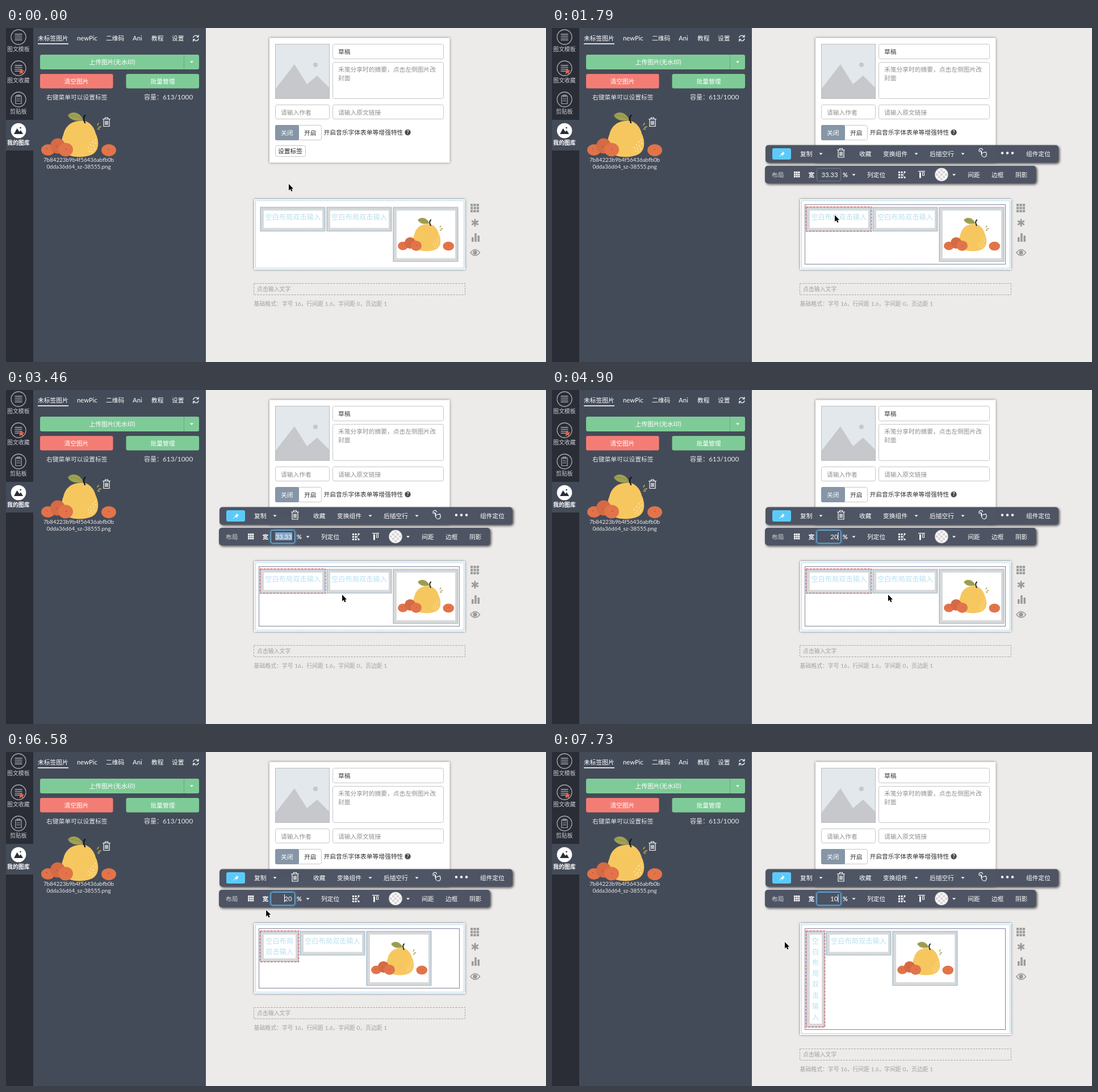
Recreate the animation shown at these times as an HTML page. Size 951x589 px, loop 8000 ms.

```html
<!DOCTYPE html>
<html lang="zh-CN">
<head>
<meta charset="utf-8">
<style>
  html, body { margin: 0; width: 100%; height: 100%; overflow: hidden; background: #ecebea; }
  svg { display: block; width: 100%; height: 100%; font-family: Lato, "Noto Sans CJK SC", "Noto Sans CJK", sans-serif; }
  .shadow { filter: drop-shadow(2px 2px 2px #000a); }
  .card { filter: drop-shadow(0 0 2px #0007); }
  .glow { filter: drop-shadow(0 0 2px #5cb8f0); }
</style>
</head>
<body>
<svg id="stage" viewBox="0 0 951 589"></svg>
<script>
const LOOP = 8000, SIZE = 10.75;

// Markup helpers
const rect = (x, y, w, h, fill, extra = '') =>
  `<rect x="${x}" y="${y}" width="${w}" height="${h}" fill="${fill}" ${extra}/>`;
const box = (x, y, w, h, stroke, extra = '') =>
  rect(x + .5, y + .5, w - 1, h - 1, 'none', `stroke="${stroke}" ${extra}`);
const text = (x, y, label, fill, size = SIZE, extra = '') =>
  `<text x="${x}" y="${y}" fill="${fill}" font-size="${size}" ${extra}>${label}</text>`;
const circle = (x, y, r, fill, extra = '') => `<circle cx="${x}" cy="${y}" r="${r}" fill="${fill}" ${extra}/>`;
const oval = (x, y, rx, ry, fill) => `<ellipse cx="${x}" cy="${y}" rx="${rx}" ry="${ry}" fill="${fill}"/>`;
const path = (d, fill, extra = '') => `<path d="${d}" fill="${fill}" ${extra}/>`;
const line = (d, stroke, width = 1, extra = '') =>
  path(d, 'none', `stroke="${stroke}" stroke-width="${width}" stroke-linecap="round" stroke-linejoin="round" ${extra}`);
const group = (content, attrs = '') => `<g ${attrs}>${content}</g>`;
const at = (x, y, content) => group(content, `transform="translate(${x} ${y})"`);
const chevron = (x, y, fill = '#fff') => path(`M${x - 3} ${y - 1.5}h6l-3 3.2z`, fill);
const grid = (x, y, cols, rows, pitchX, pitchY, w, h, fill) => {
  let out = '';
  for (let i = 0; i < cols * rows; i++)
    out += rect(x + i % cols * pitchX, y + Math.floor(i / cols) * pitchY, w, h, fill);
  return out;
};
const BOLD = 'font-weight="700"', ROUND = 'rx="3"';

const trash = (x, y) => at(x, y,
  line('M-6.5 -5.5H6.5M-2.5 -5.5V-8H2.5V-5.5M-5 -5.5V7.5H5V-5.5M-2 -2V4.5M0 -2V4.5M2 -2V4.5', '#fff', 1.2));

function fruit() {
  const seeds = [[157, 197], [153, 201], [158, 203], [149, 206], [154, 208], [145, 211],
                 [150, 213], [156, 213], [147, 217], [152, 218]];
  return path('M128 164C142 160 155 172 158 186C164 198 164 213 156 220C147 229 117 230 107 222C97 214 96 200 101 188C104 174 114 165 128 164Z', '#f7c75f') +
    path('M109 154C115 146 130 147 136 162C126 165 114 164 109 154Z', '#9fa052') +
    line('M111 154Q125 154 135 161', '#85873f', .8) +
    line('M139.500 154C136 157 136.500 162 139 167', '#17191c', 2.4) +
    seeds.map(([x, y]) => oval(x, y, 1, 1.4, '#fbe6ae')).join('') +
    line('M161 171l2 -3M163 175.500l4 -1.500M161.500 178l3 .5', '#a9a14f', 1.900) +
    oval(74, 215, 12, 10, '#e0734a') + oval(91, 208, 13, 13.5, '#d56a44') +
    oval(105, 214.5, 13, 12, '#e1744a') + oval(181, 215.5, 13, 10.5, '#e1744a') +
    [[72, 213], [89, 209], [106, 214], [181, 214]].map(([x, y]) => circle(x, y, .9, '#a94c30')).join('');
}

function sidebar() {
  const gray = '#a9acb2';
  const ring = y => circle(22, y, 13, 'none', `stroke="${gray}" stroke-width="1.3"`);
  const rows = y => line([-5, -1.7, 1.7, 5].map(d => `M16 ${y + d}h12`).join(''), gray, 1.3);
  return rect(0, 0, 48, 589, '#2a2d36') + rect(0, 162, 48, 54, '#444b58') +
    ring(16) + rows(16) + ring(71) + rows(71) +
    path('M27 71l1.700 3.400 3.700 .5-2.700 2.600.7 3.700-3.400-1.800-3.400 1.800.7-3.700-2.700-2.600 3.700-.5z', '#d9694f') +
    ring(126) + line('M17 119.500h10v14h-10zM19.500 118h5v3h-5zM19.500 125h5M19.500 128.500h5', gray, 1.2) +
    circle(22, 181, 13.3, '#fff') + path('M14 187l5.500-10 4 6 2.500-2.500 4 6.500z', '#2a2d36') + circle(25.5, 176, 1.3, '#2a2d36') +
    text(2, 41, '图文模板', '#c9cbd0', 9.9) + text(2, 96, '图文收藏', '#c9cbd0', 9.9) +
    text(7, 151, '剪贴板', '#c9cbd0', 9.9) + text(2, 206, '我的图库', '#fff', 9.9, BOLD);
}

function library() {
  const green = '#7ecb98', small = 'text-anchor="middle"';
  return rect(48, 0, 304, 589, '#444b58') +
    text(56, 22, '未标签图片', '#fff', SIZE, 'font-weight="500"') + rect(56, 27, 54, 1.6, '#fff') +
    text(125, 22, 'newPic', '#fff', 11.3) + text(176, 22, '二维码', '#fff') + text(223, 22, 'Ani', '#fff', 11.3) +
    text(256, 22, '教程', '#fff') + text(292, 22, '设置', '#fff') +
    line('M329.700 17A4.800 4.800 0 0 1 338.500 15.500M339 12.500v3.300h-3.300M339 19A4.800 4.800 0 0 1 330.300 20.500M329.700 23.500v-3.300h3.300', '#fff', 1.2) +
    rect(60, 47, 280, 26, green, ROUND) + rect(313, 47, 1, 26, '#62ad7b') + chevron(327, 60) +
    text(187, 64, '上传图片(无水印)', '#fff', SIZE, small) +
    rect(60, 81, 128.500, 25.500, '#f37d74', ROUND) + text(124, 98, '清空图片', '#fff', SIZE, small) +
    rect(211.500, 81, 128.500, 25.500, green, ROUND) + text(276, 98, '批量管理', '#fff', SIZE, small) +
    text(71, 126, '右键菜单可以设置标签', '#e6e7ea') +
    text(243, 126, '容量：', '#e6e7ea', 11) + text(276, 126, '613/1000', '#e6e7ea', 11.8) +
    fruit() + trash(177, 166) +
    text(128, 236, '7b84223b9b4f56436abfb0b', '#e6e7ea', 9.8, small) +
    text(128, 248, '0dda36d64_sz-38555.png', '#e6e7ea', 9.8, small);
}

function articleCard() {
  const field = (x, y, w, h) => box(x, y, w, h, '#c6c6c6', ROUND);
  const hint = '#8f8f8f';
  return rect(464, 17.500, 317.500, 220, '#fff', 'class="card"') +
    rect(474, 28, 96, 96, '#e2e8eb') +
    path('M474 108L508 64L530 99L548 84L570 106V124H474Z', '#c7c8cc') + circle(545, 65, 4, '#c7c8cc') +
    box(474, 28, 96, 97, '#b9bcbf') +
    field(575, 28, 196, 27) + text(585, 45.500, '草稿', '#444') +
    field(575, 60, 196, 65) + text(585, 77, '禾笺分享时的摘要，点击左侧图片改', hint) + text(585, 92, '封面', hint) +
    field(474, 135, 96, 26) + text(484, 152.500, '请输入作者', hint) +
    field(575, 135, 196, 26) + text(585, 152.500, '请输入原文链接', hint) +
    field(474, 171, 82, 27) + rect(474, 171, 42, 27, '#8696a7', ROUND) +
    text(484, 188.500, '关闭', '#fff') + text(525, 188.500, '开启', '#333') +
    text(559.500, 188, '开启音乐字体表单等增强特性', '#333') +
    circle(707.500, 184, 5.200, '#4b4b4b') + text(707.500, 187.300, '?', '#fff', 9, BOLD + ' text-anchor="middle"') +
    field(474, 207, 54, 20) + text(479, 221, '设置标签', '#222', SIZE, 'font-weight="500"');
}

function sideTools() {
  const gray = '#9b9b9b';
  return grid(818, 310, 3, 3, 5.4, 5.4, 4.2, 4.2, gray) +
    line('M826 338v11M821.200 340.700l9.600 5.600M821.200 346.300l9.600-5.600', gray, 2.8) +
    rect(820, 369, 3.500, 8, gray) + rect(825.200, 362, 3.500, 15, gray) + rect(830.500, 366, 3.500, 11, gray) +
    path('M818 396Q826 385.500 834.500 396Q826 406.500 818 396Z', 'none', `stroke="${gray}" stroke-width="1.7"`) +
    circle(826, 396, 3.7, gray);
}

function cell(x, w, whiteH, selected) {
  const h = whiteH + 13;
  const frame = selected ? '#e0696b' : '#72b4d8';
  return rect(x, 315, w - 1, h, '#d8d9da') + rect(x + 7, 322, w - 14, whiteH - .5, '#fff') +
    box(x + 1, 316.500, w - 3.500, h - 2, '#69aad0', 'stroke-dasharray="1.500 1.500"') +
    (selected ? box(x, 315, w - 1, h, frame, 'stroke-width="1.500" stroke-dasharray="4 2"') : '');
}

function editor(percent, selected) {
  const label = '空白布局双击输入';
  const perLine = Math.max(1, Math.floor((percent * 3.51 - 18) / 12.25));
  const lines = label.match(new RegExp(`.{1,${perLine}}`, 'g'));
  const full = 117, firstW = Math.round(percent * 3.51);
  const firstH = Math.max(31, 19.2 * lines.length + 4);
  const second = 447 + firstW, third = second + full;
  const extra = Math.max(0, Math.round(firstH - 84.6));
  const placeholder = (x, y, s) => text(x, y, s, '#b9e0ee', 12.25, 'text-anchor="middle"');
  return rect(437, 302, 371.500, 124 + extra, '#fff', 'class="card"') +
    box(439, 304, 368, 120 + extra, '#58abd6', 'stroke-dasharray="1.500 1.500"') +
    (selected ? box(445, 311, 354, 106 + extra, '#83839b') : '') +
    cell(second, full, 31) + cell(third, full, 84.5) + cell(447, firstW, firstH, selected) +
    lines.map((s, i) => placeholder(447 + firstW / 2 - .3, 337.5 + 19.2 * i, s)).join('') +
    placeholder(second + full / 2 - .5, 337.5, label) +
    group(fruit(), `transform="translate(${third - 37.5} 223) scale(.75)"`) +
    at(0, extra, box(436, 450, 373, 21, '#a2a2a2', 'stroke-dasharray="3 2"') +
      text(442, 464, '点击输入文字', '#a0a0a0', 9.9) +
      text(436.500, 489.500, '基础格式：字号 16，行间距 1.6，字间距 0，页边距 1', '#a0a0a0', 9.9));
}

function toolbars() {
  const bar = (x, y, w, h) => rect(x, y, w, h, '#4b5261', 'rx="5" class="shadow" opacity=".98"');
  const label = (x, y, s, fill = '#fff', extra = '') => text(x, y, s, fill, SIZE, extra);
  let checks = '';
  for (let i = 0; i < 25; i += 2)
    checks += rect(676 + i % 5 * 4, 248.5 + Math.floor(i / 5) * 4, 4, 4, '#d8d2d4');
  return bar(376, 206.500, 516, 31) + bar(375, 243, 477.500, 31) +
    rect(388, 212, 33, 20, '#5ccaf9', ROUND) +
    path('M405.500 217l4.500 4.500-1.200 .3-2 2-.2 2-4.200-4.200 2-.2 1.600-2z', '#fff') + line('M404 223l-3.500 3.500', '#fff', 1) +
    label(437, 226, '复制') + chevron(473.5, 222) + trash(509, 220.5) +
    label(541, 226, '收藏') + label(583, 226, '变换组件') + chevron(641.5, 222) +
    label(665, 226, '后插空行') + chevron(723.5, 222) +
    line('M757 222l-2.500-6.500M757.500 221l-1.500-4M756 221.500c1 5 3 6 5.500 6c3 0 4-3 3.500-6.500l-1-2.500-5 1.500M753 218a3.300 3.300 0 1 1 5.500-3', '#fff', 1.2) +
    [793, 802, 811].map(x => circle(x, 220.5, 2.2, '#fff')).join('') + label(835, 226, '组件定位') +
    label(387, 262.500, '布局', '#d4d6da') + grid(426, 253, 3, 3, 3.7, 3.7, 2.9, 3, '#fff') +
    label(451.500, 262.500, '宽', '#fff', BOLD) + label(512, 262.500, '%', '#fff', BOLD) + chevron(531.5, 259) +
    label(555, 262.500, '列定位') +
    grid(610, 253, 2, 3, 4.5, 4.5, 3, 3, '#fff') + line('M618 259l4-5M618 260l4 4', '#fff', 1) +
    circle(621, 254, 1.600, '#fff') + circle(621, 263.500, 1.600, '#fff') +
    rect(645, 252, 12, 1.3, '#fff') + rect(647, 254.500, 2.800, 10, '#fff') + box(652, 254.500, 4, 6, '#fff') +
    circle(686, 258.500, 11, '#fff') + group(checks, 'clip-path="url(#swatch)"') +
    circle(686, 258.500, 11, 'none', 'stroke="#e9e9e9" stroke-width="1.500"') + chevron(708, 259) +
    label(732, 262.500, '间距') + label(774, 262.500, '边框') + label(816, 262.500, '阴影');
}

function widthInput(t) {
  const value = t < 4000 ? '33.33' : t < 4900 ? '2' : t < 7730 ? '20' : '10';
  const within = (a, b) => t >= a && t < b;
  const endCaret = within(4000, 4540) || within(4900, 5350) || t >= 7730;
  const startCaret = within(6310, 6930) || within(7460, 7730);
  const focused = t >= 2580;
  return rect(466.500, 247.500, 42, 22.500, '#4b5261',
      `${ROUND} stroke="${focused ? '#6fb9ec' : '#747b88'}" ${focused ? 'class="glow"' : ''}`) +
    (within(2670, 4000) ? rect(474, 251, 30, 14, '#86a5ca') : '') +
    text(503.5, 262.5, value, '#fff', 11.4, 'text-anchor="end"') +
    (endCaret ? rect(503.5, 251, 1, 14, '#fff') : '') +
    (startCaret ? rect(490, 251, 1, 14, '#fff') : '');
}

// Pointer moves advance in even hops: start, last hop, hop count, destination, I-beam on arrival
const MOVES = [
  [630, 890, 4, 498, 332, true],
  [1610, 1610, 1, 498, 330],
  [1970, 2400, 6, 491, 259, true],
  [3200, 3370, 3, 592, 369],
  [3460, 3460, 1, 592, 361],
  [5610, 5790, 3, 486, 290],
  [5880, 6140, 4, 475, 259, true],
  [6490, 6930, 6, 410, 335],
];

function pointer(t) {
  let x = 498, y = 275, beam = false;
  for (const [start, end, hops, toX, toY, toBeam] of MOVES) {
    if (t < start) break;
    const gap = (end - start) / Math.max(1, hops - 1);
    const hop = t >= end ? hops : 1 + Math.floor((t - start) / gap);
    const p = hop / hops, eased = p * p * (3 - 2 * p);
    x += (toX - x) * eased;
    y += (toY - y) * eased;
    beam = p === 1 && !!toBeam;
  }
  const ibeam = 'M-2.500 -6Q0 -6 0 -4Q0 -6 2.500 -6M0 -4V4M-2.500 6Q0 6 0 4Q0 6 2.500 6M-1.500 1.500h3';
  return at(x, y, beam
    ? line(ibeam, '#fff', 2.2) + line(ibeam, '#222', 1)
    : path('M0 0V11.500L2.700 9.100L4.500 13.200L6.500 12.300L4.700 8.400H8.200Z', '#000', 'stroke="#fff" stroke-width="1.400" paint-order="stroke"'));
}

const stage = document.getElementById('stage');
stage.innerHTML = '<defs><clipPath id="swatch"><circle cx="686" cy="258.500" r="10"/></clipPath></defs>' +
  rect(0, 0, 951, 589, '#ecebea') + sidebar() + library() + articleCard() + sideTools() +
  '<g id="editor"></g>' + group(toolbars(), 'id="bars"') + '<g id="input"></g><g id="pointer"></g>';

const shown = {};
function show(id, markup) {
  if (shown[id] !== markup) document.getElementById(id).innerHTML = shown[id] = markup;
}

function render(t) {
  const selected = t >= 1790;
  const percent = t < 5170 ? 33.33 : t < 7730 ? 20 : 10;
  show('editor', editor(percent, selected));
  document.getElementById('bars').style.display = selected ? '' : 'none';
  show('input', selected ? widthInput(t) : '');
  show('pointer', pointer(t));
}

const began = performance.now();
function tick() {
  render((performance.now() - began) % LOOP);
  requestAnimationFrame(tick);
}
tick();
</script>
</body>
</html>
```
